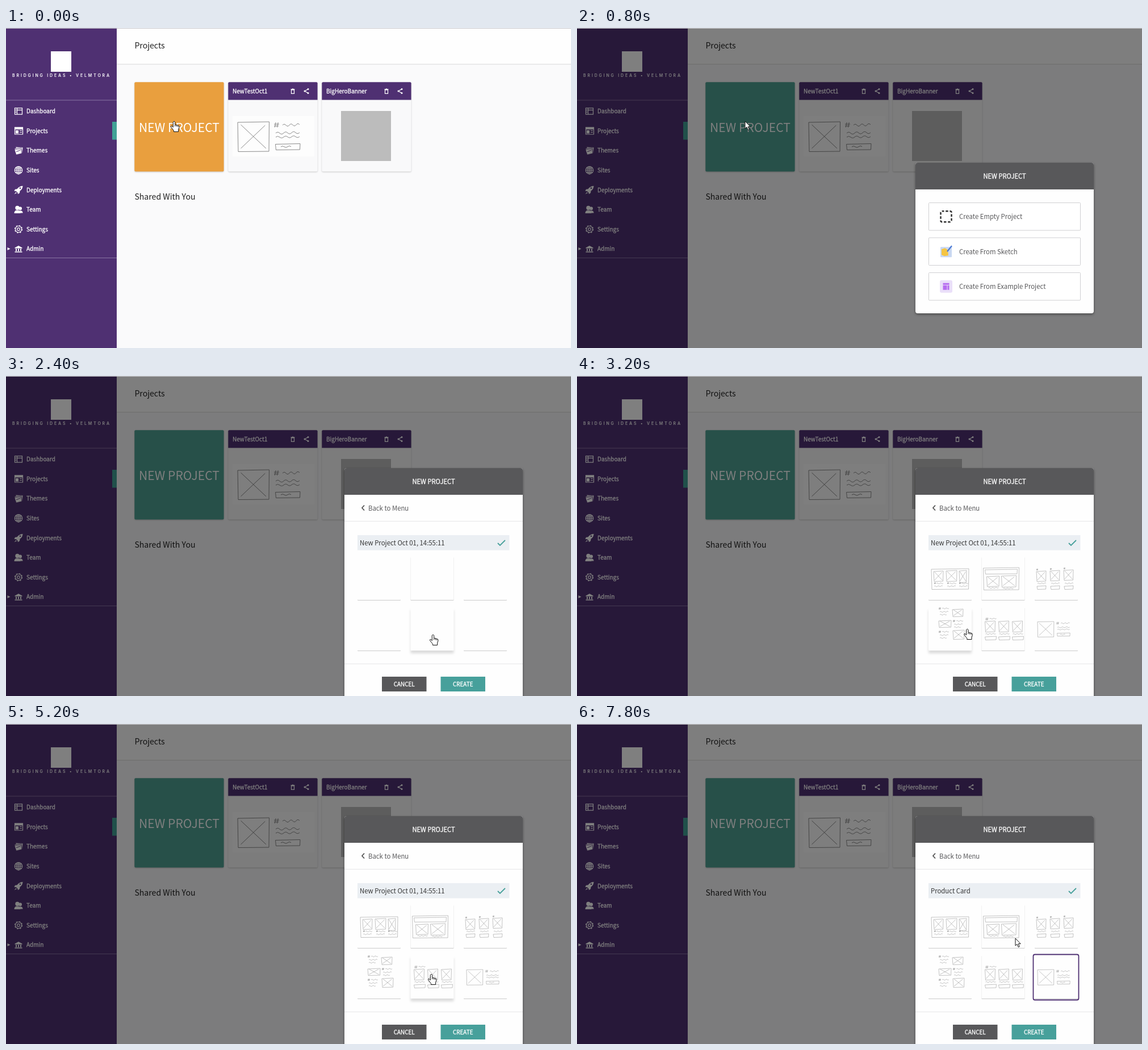
An HTML page for the animation above (8000 ms loop, 995 px wide and 563 px high).

```html
<!DOCTYPE html>
<html lang="en">
<head>
<meta charset="utf-8">
<title>New project</title>
<style>
html, body { margin: 0; width: 100%; height: 100%; overflow: hidden; background: #fafafc; }
svg { display: block; width: 995px; height: 563px; }
text { font-family: "Noto Sans CJK JP", "Noto Sans CJK SC", "Noto Sans CJK", "Open Sans", sans-serif; white-space: pre; }
.medium { stroke: #fff; stroke-width: .3; }
.shadow { filter: drop-shadow(0 1px 1px #0003); }
.card { fill: #fefefe; filter: drop-shadow(0 1px .7px #0003); }
.card.hover { filter: drop-shadow(0 5px 2px #0002); }
.modal { filter: drop-shadow(0 2px 2px #0006); }
.sketch { fill: none; stroke: #8a8a8a; }
.line { fill: none; stroke: #fff; stroke-width: 1.2; }
</style>
</head>
<body>
<svg id="stage" viewBox="0 0 995 563"></svg>
<script>
const PURPLE = '#4f3072', TEAL = '#47a09b', GREY = '#58585a';
const ORANGE = [233, 159, 62], GREEN = [79, 161, 148];

const rect = (x, y, w, h, fill, extra = '') =>
  `<rect x="${x}" y="${y}" width="${w}" height="${h}" fill="${fill}" ${extra}/>`;
const text = (x, y, size, fill, str, extra = '') =>
  `<text x="${x}" y="${y}" font-size="${size}" fill="${fill}" ${extra}>${str}</text>`;
const path = (d, extra = '') => `<path d="${d}" ${extra}/>`;
const at = (x, y, body, scale = 1) => `<g transform="translate(${x} ${y}) scale(${scale})">${body}</g>`;
const MID = 'text-anchor="middle"', MEDIUM = 'class="medium"';

// Hand-drawn pieces, returned as path data
const box = (x, y, w, h) => `M${x} ${y + 1}L${x + w} ${y}L${x + w - .5} ${y + h}L${x + 1} ${y + h + .5}Z`;
const xbox = (x, y, w, h) =>
  box(x, y, w, h) + `M${x + w * .1} ${y + h * .1}L${x + w * .9} ${y + h * .9}M${x + w * .87} ${y + h * .12}L${x + w * .1} ${y + h * .9}`;
const wave = (x, y, w, amp = 1.6, step = 3) =>
  `M${x} ${y}q${step / 2} ${-amp} ${step} 0` + `t${step} ${-amp / 15}`.repeat(w / step - 1);
const hash = (x, y, s) =>
  `M${x + s * .35} ${y}l${-s * .2} ${s}M${x + s * .8} ${y}l${-s * .2} ${s}M${x} ${y + s * .35}h${s}M${x} ${y + s * .7}h${s * .9}`;

const productSketch = xbox(0, 0, 55.500, 52) + hash(64, 1, 9) + wave(79, 6, 35, 3.500, 6) +
  wave(67, 20, 43, 3.500, 7) + wave(67, 27, 42, 3, 7) + box(66.500, 38.500, 43.500, 10.500) + wave(76, 44, 21, 2.500, 6);

// Drawn relative to the top left corner of each 76 px card
const thumbs = [
  box(5, 21, 66, 36) + xbox(9, 25, 17, 18) + xbox(31, 24, 19, 19) + xbox(54, 24, 13, 21) +
    [10, 33, 54].map(x => hash(x, 45, 3) + wave(x + 4, 47, 12) + wave(x, 52, 15)).join(''),
  box(3, 19, 63, 39) + box(6, 22, 57, 8) + xbox(9, 34, 22, 18) + xbox(35, 33, 26, 20) + wave(12, 55, 18) + wave(38, 56, 18),
  [3, 27, 51].map((x, i) => hash(x, 21 - i, 3) + xbox(x, 25 - i, 17, 18) + wave(x + 2, 47, 15) + box(x + 1, 51, 16, 6)).join(''),
  [[20, 2], [45, 24], [20, 43]].map(([x, y]) => hash(x - 2, y - 2, 4) + wave(x + 4, y, 12) + wave(x, y + 6, 15) + wave(x, y + 11, 12)).join('') +
    xbox(42, 3, 19, 13) + xbox(18, 23, 22, 12) + xbox(43, 40, 20, 16),
  hash(7, 18, 5) + wave(14, 20, 12) +
    [6, 30, 54].map(x => xbox(x, 24, 18, 19) + wave(x + 1, 47, 18) + box(x, 51, 20, 6)).join('')
];

const icons = [
  path('M-6.500-5.500h13v11h-13zM-2.500-5.500v11M-2.500-2h9M-6.500-2h3M-6.500 1.500h3', 'class="line"'),
  path('M-6.500-6h14v12h-14zM2-.5h4M2 2.500h4', 'class="line"') + path('M-7-6.500H8V-2.500H-7zM-5-1H0V4.500H-5z'),
  `<g stroke="${PURPLE}" stroke-width=".7">` + path('M-5-6.500L8-5.500 7 3-4 2z') + path('M-7-3.500L5-5 7 4-5 4z') +
    path('M-7-1.500L4-3 6 5-4 7.500z') + '</g>' + path('M-4 2L3-.5', `stroke="${PURPLE}"`),
  '<g class="line"><circle r="6.700"/><ellipse rx="3" ry="6.700"/>' + path('M0-6.700V6.700M-6.500 0h13M-5.500-3.500h11M-5.500 3.500h11') + '</g>',
  path('M7.500-7Q1-6.500-2.500-1.500L-6-1-7.500 2-4 2.500-1.500 5-1 7.500 2 5.500 2.500 2Q7.500-1.500 7.500-7zM-4.500 4L-7.500 7.500-3 5.500z') +
    `<circle cx="3" cy="-3" r="1.300" fill="${PURPLE}"/>`,
  '<circle cx="3" cy="-2" r="3"/>' + path('M1 2Q7.500 1 7.500 6H2z') + '<circle cx="-2" cy="-3" r="3.700"/>' +
    path('M-7.500 6.500Q-7.500 1-2 1T3.500 6.500z'),
  '<g class="line"><circle r="2.300"/><circle r="5.500"/><circle r="6.500" stroke-dasharray="2.600 2.505"/></g>',
  path('M0-5.500L6.500-2V-.8H-6.500V-2zM-5 0h2v4h-2zM-1 0h2v4h-2zM3 0h2v4h-2zM-6.500 4.700h13v1.500h-13z')
];

function sidebar() {
  const labels = ['Dashboard', 'Projects', 'Themes', 'Sites', 'Deployments', 'Team', 'Settings', 'Admin'];
  return rect(0, 0, 195, 563, PURPLE) + rect(79, 41, 36, 36, '#fff') +
    text(11, 86, 7, '#fff', 'BRIDGING IDEAS • VELMTORA', 'style="font-family:Inter,sans-serif;font-weight:600;letter-spacing:2.85px"') +
    rect(0, 126.500, 195, 1, '#8a75a3') + rect(0, 404, 195, 1, '#8a75a3') + rect(187, 165, 8, 31.500, '#41a296') +
    labels.map((label, i) => {
      const y = 146.400 + i * 34.600;
      return at(22, y, `<g fill="#fff">${icons[i]}</g>`) + text(36, y + 3.800, 10, '#fff', label, MEDIUM);
    }).join('') + path('M2.500 386v5l5-2.500z', 'fill="#fff"');
}

function projectCard(x, name, body) {
  const trash = path('M-2.500-2.500h5v6.500h-5zM-3.500-3.500h7M-1-4.300h2', 'class="line"');
  const share = path('M3-3.500L-3 0 3 3.500', 'class="line"') +
    [[3, -3.500], [-3, 0], [3, 3.500]].map(([cx, cy]) => `<circle cx="${cx}" cy="${cy}" r="1.500" fill="#fff"/>`).join('');
  return rect(x, 95.300, 157.300, 157.200, '#f9f9fa', 'rx="2" class="shadow"') +
    path(`M${x} 126.500V97.300q0-2 2-2h153.300q2 0 2 2v29.200z`, `fill="${PURPLE}"`) +
    text(x + 7.700, 114.700, 10, '#fff', name, MEDIUM) + at(x + 113.700, 111.300, trash) + at(x + 137.700, 111, share) + body;
}

function page() {
  return rect(0, 0, 995, 563, '#fafafb') + rect(195, 0, 800, 63, '#fefefe') +
    rect(195, 63, 800, 1, '#000', 'opacity=".1"') + rect(195, 64, 800, 1, '#000', 'opacity=".03"') + sidebar() +
    text(226.400, 36, 14.100, '#222', 'Projects') + text(226.400, 301.700, 14.100, '#222', 'Shared With You') +
    rect(226.300, 95.300, 157.300, 157.200, '', 'id="button" rx="2" class="shadow"') +
    text(305, 182.500, 21.100, '#fff', 'NEW PROJECT', MID) +
    projectCard(391.300, 'NewTestOct1', rect(399, 155, 144, 71, '#fdfdfd') + at(408, 165, path(productSketch, 'class="sketch"'))) +
    projectCard(556.300, 'BigHeroBanner', rect(590, 146, 88, 88, '#bcbcbc'));
}

const modal = (id, y, h, body) => `<g id="${id}">` + rect(596, y, 314, h, '#fefefe', 'rx="4" class="modal"') +
  path(`M596 ${y + 47}v-43q0-4 4-4h306q4 0 4 4v43z`, `fill="${GREY}"`) +
  text(753, y + 28, 11.200, '#fff', 'NEW PROJECT', `${MID} ${MEDIUM}`) + body + '</g>';

const menuRects = [307.500, 369, 430.500].map(y => ({ x: 619.500, y, w: 267, h: 48.500 }));
const cardRects = [0, 1, 2, 3, 4, 5].map(i => ({ x: 619 + i % 3 * 93.500, y: i < 3 ? 318 : 407, w: 76, h: 76 }));

function menu() {
  const labels = ['Create Empty Project', 'Create From Sketch', 'Create From Example Project'];
  const pictures = [
    rect(-9.500, -9.500, 19, 19, 'none', 'rx="2.500" stroke="#333" stroke-width="2.500" stroke-dasharray="4.500 2.700" stroke-dashoffset="1"'),
    rect(-10, -8, 20, 18, '#c9d8f2', 'rx="1"') + path('M-8-4L-2-6 3-3 4 7-3 8-8 6z', 'fill="#f5c543"') +
      path('M10-10L2 0', 'stroke="#4a79d4" stroke-width="2.200"'),
    rect(-11, -11, 22, 22, '#eadff9', 'rx="3"') + path('M-5.500-6h11v3h-11zM-5.500-2h7v8h-7zM2.500-2h3v8h-3z', 'fill="#b66cf0"')
  ];
  return menuRects.map((r, i) => rect(r.x, r.y, r.w, r.h, '#fff', 'rx="1" stroke="#cfcfd2"') +
    text(673, r.y + 28.700, 11.350, '#58585a', labels[i])).join('') +
    `<g id="menuIcons">${menuRects.map((r, i) => at(650, r.y + 24.300, pictures[i])).join('')}</g>`;
}

function form() {
  const button = (x, fill, label) => rect(x, 529, 78.500, 26, fill) + text(x + 39.200, 545.700, 9.900, '#fff', label, `${MID} ${MEDIUM}`);
  return path('M631 227.500l-4 4.500 4 4.500', 'fill="none" stroke="#555" stroke-width="1.800"') +
    text(638, 236.700, 11.350, '#58585a', 'Back to Menu') +
    rect(596, 255, 314, 1, '#e6e6e8') + rect(596, 506, 314, 1, '#e6e6e8') +
    rect(619, 280, 267.500, 26.500, '#ebeff3') + text(623, 297.900, 11.350, '#333', '', 'id="name"') +
    path('M866 294l4 4 9-9', `fill="none" stroke="${TEAL}" stroke-width="1.800"`) +
    cardRects.map(r => rect(r.x, r.y, r.w, r.h, '#fefefe', 'class="card" rx="1"')).join('') +
    '<g id="thumbs" class="sketch" stroke-width=".6" opacity=".85">' +
    thumbs.map((d, i) => at(cardRects[i].x, cardRects[i].y, path(d))).join('') +
    at(811, 432, path(productSketch, 'stroke-width="1.100"'), .52) + '</g>' +
    rect(803.500, 405.500, 80, 80, 'none', `id="selected" rx="3" stroke="${PURPLE}" stroke-width="1.800"`) +
    button(662, GREY, 'CANCEL') + button(765.500, TEAL, 'CREATE');
}

const cursors =
  path('M0 0V13L3 10.300 5.200 15.500 7.300 14.600 5.200 9.700H9.200Z', 'id="arrow" fill="#fff" stroke="#111"') +
  path('M-1.700 1.500Q0-1.400 1.700 1.500V6L7.500 7.500Q9.400 8 9 10.500L7.600 15V18.500H-.5V16.500L-5.300 10.500Q-6 8.200-4.300 8.300L-1.700 10.500ZM1.700 6.500V9M4.300 7.200V9.500M6.800 8V10',
    'id="hand" fill="#fff" stroke="#111"');

stage.innerHTML = page() + rect(0, 0, 995, 563, '#000', 'id="shade"') +
  modal('menuModal', 237, 265, menu()) + modal('formModal', 162, 420, form()) +
  rect(0, 0, 995, 1, '#c8c8cc') + `<g id="cursor">${cursors}</g>`;

const el = id => document.getElementById(id);
const set = (id, name, value) => el(id).setAttribute(name, value);
const show = (id, on) => el(id).style.display = on ? '' : 'none';
const cards = [...document.querySelectorAll('.card')];

// Pointer stops: time, x, y
const route = [
  [0, 296, 164], [800, 296, 164], [1600, 752, 455], [2800, 752, 455], [3400, 655, 440], [3800, 650, 360],
  [4200, 710, 334], [4400, 752, 350], [4800, 843, 360], [5000, 843, 440], [5400, 655, 440],
  [6000, 832, 443], [7200, 832, 443], [7800, 772, 377], [8000, 772, 377]
];
function pointer(t) {
  const i = route.findIndex(stop => stop[0] > t);
  const [t0, x0, y0] = route[i - 1], [t1, x1, y1] = route[i];
  const p = (t - t0) / (t1 - t0);
  return [x0 + (x1 - x0) * p, y0 + (y1 - y0) * p];
}

function draw(t) {
  const fade = t < 600 ? 0 : t < 800 ? .3 : 1;
  const formOpen = t >= 1800, chosen = t >= 7200;
  set('button', 'fill', `rgb(${ORANGE.map((c, i) => Math.round(c + (GREEN[i] - c) * fade))})`);
  set('shade', 'opacity', fade === 1 ? .5 : fade * .06);
  set('menuModal', 'opacity', fade === 1 ? 1 : fade * .4);
  show('menuModal', fade && !formOpen);
  show('menuIcons', fade === 1);
  show('formModal', formOpen);
  show('thumbs', t >= 2600);
  show('selected', chosen);
  el('name').textContent = chosen ? 'Product Card' : 'New Project Oct 01, 14:55:11';

  const [x, y] = pointer(t);
  const inside = r => x >= r.x && x <= r.x + r.w && y >= r.y && y <= r.y + r.h;
  const active = t <= 7200;
  cards.forEach((card, i) => card.classList.toggle('hover', active && inside(cardRects[i])));
  const hand = t < 600 || active && t > 800 && (formOpen ? cardRects : menuRects).some(inside);
  show('hand', hand);
  show('arrow', !hand);
  set('cursor', 'transform', `translate(${x} ${y})`);
}

function tick() {
  draw(Math.floor(performance.now() % 8000 / 200) * 200);
  requestAnimationFrame(tick);
}
tick();
</script>
</body>
</html>
```
